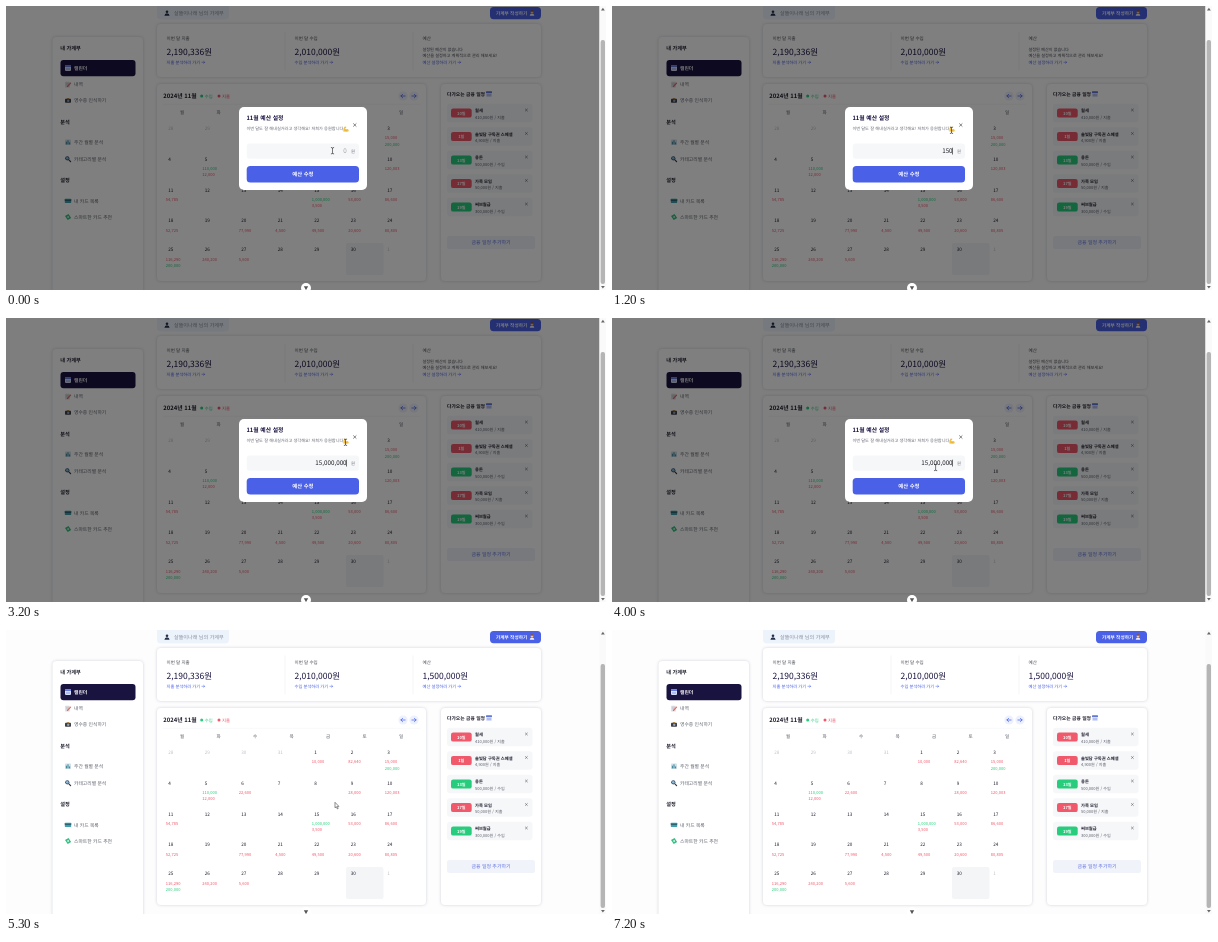
Animation of 600x284 px, one loop 7.3 s. Source, as an HTML page:

```html
<!DOCTYPE html>
<html lang="ko">
<head>
<meta charset="utf-8">
<title>가계부</title>
<style>
html, body { margin: 0; width: 100%; height: 100%; overflow: hidden; background: #fdfdfe; }
svg { display: block; width: 100vw; height: 100vh; }
text { font-family: "Noto Sans CJK KR", "Noto Sans CJK", "Noto Sans", sans-serif; white-space: pre; }
.card { fill: #fff; filter: drop-shadow(0 0.6px 1.6px rgba(30, 35, 70, .2)); }
</style>
</head>
<body>
<svg id="stage" viewBox="0 0 600 284" preserveAspectRatio="none" text-rendering="geometricPrecision"></svg>
<script>
const LOOP = 7300, CLOSE = 5300;
const BLUE = '#4a60e6', RED = '#f0586b', GREEN = '#27cd7c', INK = '#1b1b2b', NAVY = '#191340';
const GREY = '#5c606b', PALE = '#bfc1c8', SOFT = '#f6f7f9';

const rect = (x, y, w, h, r, fill, more = '') =>
  `<rect x="${x}" y="${y}" width="${w}" height="${h}" rx="${r}" fill="${fill}" ${more}/>`;
const card = (x, y, w, h) => rect(x, y, w, h, 4, '#fff', 'class="card"');
const dot = (x, y, r, fill) => `<circle cx="${x}" cy="${y}" r="${r}" fill="${fill}"/>`;
const line = (d, stroke, w = .6) =>
  `<path d="${d}" fill="none" stroke="${stroke}" stroke-width="${w}" stroke-linecap="round" stroke-linejoin="round"/>`;
const shape = (d, fill) => `<path d="${d}" fill="${fill}"/>`;
const text = (s, x, y, size, fill = INK, weight = 400, anchor = 'start', id = '') =>
  `<text x="${x}" y="${y}" font-size="${size}" fill="${fill}" font-weight="${weight}" text-anchor="${anchor}" ${id && `id="${id}"`}>${s}</text>`;
const group = (id, body) => `<g id="${id}">${body}</g>`;
const cross = (x, y, r, c) => line(`M${x - r} ${y - r}l${2 * r} ${2 * r}m0 ${-2 * r}l${-2 * r} ${2 * r}`, c, .55);

// small pictograms around (0,0), about 6px wide
const icons = {
  calendar: rect(-3, -2.7, 6, 5.6, .8, '#dfe6fb') + rect(-3, -2.7, 6, 1.7, .6, '#6378dc') +
    line('M-1.8 .3h3.6M-1.8 1.7h3.6', '#8fa0e4', .7),
  memo: rect(-2.8, -2.7, 4.6, 5.6, .5, '#d9dce2') + line('M-1.8 -1.2h2.6M-1.8 .2h2', '#a9aeb8', .4) +
    line('M-.6 2L2.6 -1.4', '#e8685f', 1.1),
  camera: rect(-3, -1.7, 6, 4, .7, '#3d4048') + rect(-1.2, -2.5, 2.4, 1, .3, '#b58a4a') +
    dot(.2, .3, 1.2, '#91a2b4'),
  chart: rect(-3, -2.8, 6, 5.6, .8, '#cfe0e6') +
    line('M-1.6 1.7V-.2M0 1.7V-1.6M1.6 1.7V.5', '#36839b', 1),
  lens: line('M.9 .8L2.6 2.6', '#333846', 1.2) + dot(-.7, -.7, 2.1, '#33516e') + dot(-.7, -.7, 1.3, '#8fbad4'),
  bank: rect(-3.2, -2, 6.4, 4.2, .6, '#3f9fae') + rect(-3.2, -1, 6.4, 1.1, 0, '#265a68'),
  money: shape('M-3 -1L.5 -3L3.2 1L-.3 3Z', '#35bf82') + dot(.1, 0, 1, '#c6f0dc'),
  person: dot(0, -1.3, 1.3, '#25304a') + shape('M-2.6 2.7Q-2.4 .2 0 .2T2.6 2.7Z', '#25304a'),
  writer: dot(0, -1.2, 1.5, '#f2c49b') + shape('M-1.7 -1.1Q-1.5 -3.1 0 -3T1.7 -1.1Q0 -2.1 -1.7 -1.1Z', '#7b4632') +
    shape('M-2.3 2.8Q-2 .5 0 .5T2.3 2.8Z', '#f0eef5'),
  arm: shape('M-2.7 2.2Q-2.9 -.4 -1.6 -2.5L.2 -2.7L.1 -1.3L-.8 -.9L-.7 .4Q1.6 -.9 2.8 1Q2.8 2.6 .6 2.6Z', '#f0c145') +
    line('M-.7 .5Q.1 .5 .4 1.2', '#c58f2c', .4)
};
const icon = (name, x, y) => `<g transform="translate(${x} ${y})">${icons[name]}</g>`;

function header() {
  return rect(151, -5, 72, 18.5, 4, '#edf3fb') + icon('person', 161, 7) +
    text('살뜰이나래 님의 가계부', 168, 9, 5.1, '#858d9d') +
    rect(484, 1, 51, 12.2, 3.6, BLUE) + text('가계부 작성하기', 490, 8.8, 4.65, '#fff', 700) +
    icon('writer', 526, 7);
}

function summary() {
  const cols = [['이번 달 지출', '2,190,336원', '지출 분석하러 가기'],
    ['이번 달 수입', '2,010,000원', '수입 분석하러 가기'], ['예산', '1,500,000원', '예산 설정하러 가기']];
  let s = card(151, 18, 384, 53) + line('M279 26V64M407 26V64', '#e8e9ee', .5);
  cols.forEach(([label, sum, link], i) => {
    const x = 160.5 + 128 * i;
    s += text(label, x, 33.8, 4.5, '#444751');
    const value = text(sum, x, 49, 8.5, NAVY, 500);
    s += i < 2 ? value : group('budget', value) + group('noBudget',
      text('설정된 예산이 없습니다', x, 45, 4.15, '#444751') +
      text('예산을 설정하고 계획적으로 관리 해보세요!', x, 51.3, 4.17, '#444751'));
    s += text(link, x, 57.8, 4.25, BLUE, 500) + line(`M${x + 35.4} 56.3h2.8m-1.1 -1l1.1 1l-1.1 1`, BLUE, .5);
  });
  return s;
}

function sidebar() {
  const menu = [[62, 'calendar', '캘린더'], [78.5, 'memo', '내역'], [94.5, 'camera', '영수증 인식하기'],
    [136.3, 'chart', '주간 월별 분석'], [153, 'lens', '카테고리별 분석'],
    [194.7, 'bank', '내 카드 목록'], [211, 'money', '스마트한 카드 추천']];
  let s = card(46.5, 31, 90.5, 270) + rect(54.5, 54, 75, 16.2, 3, NAVY);
  for (const [y, name] of [[43.8, '내 가계부'], [118, '분석'], [176.2, '설정']])
    s += text(name, 54.3, y, 5.2, INK, 700);
  menu.forEach(([y, pic, name], i) => {
    s += icon(pic, 62, y) + text(name, 68, y + 1.8, 4.8, i ? GREY : '#fff', i ? 400 : 700);
  });
  return s;
}

// day: amounts, "+" marks income
const spend = {
  1: '10,000', 2: '82,640', 3: '15,000 +200,000', 5: '+110,000 12,000', 6: '22,600', 9: '28,000',
  10: '120,003', 11: '54,785', 15: '+1,000,000 3,500', 16: '53,000', 17: '86,600', 18: '52,725',
  20: '77,990', 21: '4,500', 22: '49,500', 23: '20,600', 24: '80,805', 25: '116,290 +200,000',
  26: '240,200', 27: '5,600'
};

function month() {
  let s = card(151, 78, 269, 197) + text('2024년 11월', 157.3, 92.2, 5.9, INK, 700) +
    dot(195.7, 90, 1.5, GREEN) + text('수입', 198.7, 91.6, 4.3, GREEN, 500) +
    dot(213, 90, 1.5, RED) + text('지출', 216, 91.6, 4.3, RED, 500);
  for (const [x, d] of [[397, -1], [408, 1]])
    s += dot(x, 90, 4.6, '#edf1fd') + line(`M${x - 2.1 * d} 90h${4.2 * d}m${-1.7 * d} -1.7l${1.7 * d} 1.7l${-1.7 * d} 1.7`, BLUE, .75);
  s += line('M157 98.4H414', '#f0f1f4', .4) + rect(340, 237, 37.5, 32, 2, '#f4f5f7');
  [...'월화수목금토일'].forEach((d, i) => s += text(d, 176 + 36.5 * i, 107.5, 4.6, '#555963', 400, 'middle'));
  for (let i = 0; i < 35; i++) {
    const x = 160 + 36.5 * (i % 7), row = Math.floor(i / 7);
    const y = row < 4 ? 124 + 30.8 * row : 245.4;
    const day = i - 3, inside = day > 0 && day < 31;
    const label = day < 1 ? day + 31 : day > 30 ? day - 30 : day;
    s += text(label, x + 2.3, y, 4.6, inside ? INK : PALE, inside ? 500 : 400);
    if (inside && spend[day]) spend[day].split(' ').forEach((a, k) => {
      const plus = a[0] === '+';
      s += text(plus ? a.slice(1) : a, x - .2, y + 9.2 + 6.3 * k, 4.05, plus ? GREEN : RED);
    });
  }
  return s;
}

function upcoming() {
  const rows = [['10일', '월세', '410,000원 / 지출'], ['1일', '솔빛담 구독권 스페셜', '4,900원 / 지출'],
    ['13일', '용돈', '500,000원 / 수입'], ['17일', '가족 모임', '50,000원 / 지출'],
    ['19일', '써브월급', '300,000원 / 수입']];
  let s = card(435, 78, 100, 197) + text('다가오는 금융 일정', 441, 90, 4.8, INK, 700) + icon('calendar', 483, 88);
  rows.forEach(([day, name, info], i) => {
    const y = 107 + 23.5 * i;
    s += rect(441, y - 9.3, 85.5, 18.6, 3, SOFT) +
      rect(445, y - 4.6, 20.7, 9.2, 2.2, info.endsWith('수입') ? GREEN : RED) +
      text(day, 455.3, y + 1.5, 4.1, '#fff', 700, 'middle') +
      text(name, 469, y - .9, 4.25, INK, 700) + text(info, 469, y + 5.5, 4.05, GREY) +
      cross(520.4, y - 3, 1, '#555');
  });
  return s + rect(441, 230, 88, 13, 2.5, '#f1f3fb') +
    text('금융 일정 추가하기', 485, 238.3, 4.95, '#5b6fdf', 500, 'middle');
}

function modal() {
  return rect(233, 101, 128, 83, 5, '#fff') + text('11월 예산 설정', 240.4, 114.4, 5.85, NAVY, 700) +
    text('이번 달도 잘 해내실거라고 생각해요! 저희가 응원합니다', 240.4, 124.3, 4.2, '#656873') +
    icon('arm', 340, 123.2) + cross(348.8, 119, 1.3, '#222') +
    rect(240.7, 137.6, 112.3, 15.2, 3, SOFT) +
    text('0', 340.6, 147.3, 6.25, '#a2a5ad', 400, 'end', 'value') +
    rect(340.4, 141.7, .6, 6.8, 0, '#111', 'id="caret"') +
    text('원', 345, 146.7, 4.4, '#73767f') +
    rect(240.7, 160, 112.3, 16.6, 3.6, BLUE, 'id="save"') +
    text('예산 수정', 296.9, 170.2, 5.35, '#fff', 700, 'middle');
}

const pointers = group('beam', line('M-1.2 -3.2Q0 -3.2 0 -2.4Q0 -3.2 1.2 -3.2M0 -2.4V2.4M-1.2 3.2Q0 3.2 0 2.4Q0 3.2 1.2 3.2', '#222', .6)) +
  group('hand', '<path d="M-1 -3.2Q-.3 -3.8 .1 -3.1V-.9L2.4 -.3Q3 0 2.8 1L2.2 3.4H-.9L-2.7 .9Q-2.6 0 -1.7 .4L-1 1Z" fill="#fff" stroke="#222" stroke-width=".5"/>') +
  group('arrow', '<path d="M-1.3 -3.5V2L0 .9L1 3.1L1.9 2.7L1 .6H2.6Z" fill="#fff" stroke="#222" stroke-width=".5"/>');

const stage = document.getElementById('stage');
stage.innerHTML = rect(0, 0, 600, 284, 0, '#fdfdfe') + header() + summary() + sidebar() + month() + upcoming() +
  group('dialog', rect(0, 0, 593.5, 284, 0, '#000', 'opacity=".5"') + modal()) +
  dot(300, 282, 5, '#fff') + shape('M297.8 280.3h4.4l-2.2 3.8z', '#555') +
  rect(593.5, 0, 6.5, 284, 0, '#fafafa') + rect(594.6, 34, 4.4, 244, 2, '#b5b5b5') +
  shape('M595 4.4h3.8l-1.9 -2.6z', '#666') + shape('M595 280h3.8l-1.9 2.6z', '#666') +
  group('cursor', pointers);

const $ = Object.fromEntries([...stage.querySelectorAll('[id]')].map(e => [e.id, e]));
const show = (e, on) => e.setAttribute('display', on ? 'inline' : 'none');

// time, typed amount
const typed = [[0, 0], [800, 1], [950, 15], [1100, 150], [1700, 1500], [1900, 15000], [2100, 150000],
  [2700, 1500000], [3000, 15000000], [4500, 1500000]];
// time, x, y of the mouse
const path = [[0, 326.5, 144.7], [300, 326.5, 144.7], [800, 339.5, 124.3], [3200, 339.5, 124.3], [3800, 323.6, 149.5],
  [4600, 323.6, 149.5], [5000, 328, 176], [5200, 328, 176], [5300, 330.3, 175.8], [LOOP, 330.3, 175.8]];

function mouse(t) {
  const i = path.findIndex(p => p[0] > t), [t0, x0, y0] = path[i - 1], [t1, x1, y1] = path[i];
  const k = (t - t0) / (t1 - t0), e = k * k * (3 - 2 * k);
  return [x0 + (x1 - x0) * e, y0 + (y1 - y0) * e];
}

function draw(t) {
  const open = t < CLOSE, [x, y] = mouse(t);
  const amount = typed.filter(p => p[0] <= t).pop()[1];
  const onSave = y > 160;
  show($.dialog, open);
  show($.noBudget, open);
  show($.budget, !open);
  $.value.textContent = amount.toLocaleString('en-US');
  $.value.setAttribute('fill', amount ? '#1a1a22' : '#a2a5ad');
  show($.caret, amount > 0 && t < 5100 && (t + 300) % 1000 < 700);
  $.save.setAttribute('fill', onSave ? '#3b50d6' : BLUE);
  $.cursor.setAttribute('transform', `translate(${x} ${y})`);
  show($.cursor, t < 5700);
  show($.beam, open && !onSave);
  show($.hand, open && onSave);
  show($.arrow, !open);
}

function tick() {
  draw(performance.now() % LOOP);
  requestAnimationFrame(tick);
}
tick();
</script>
</body>
</html>
```
